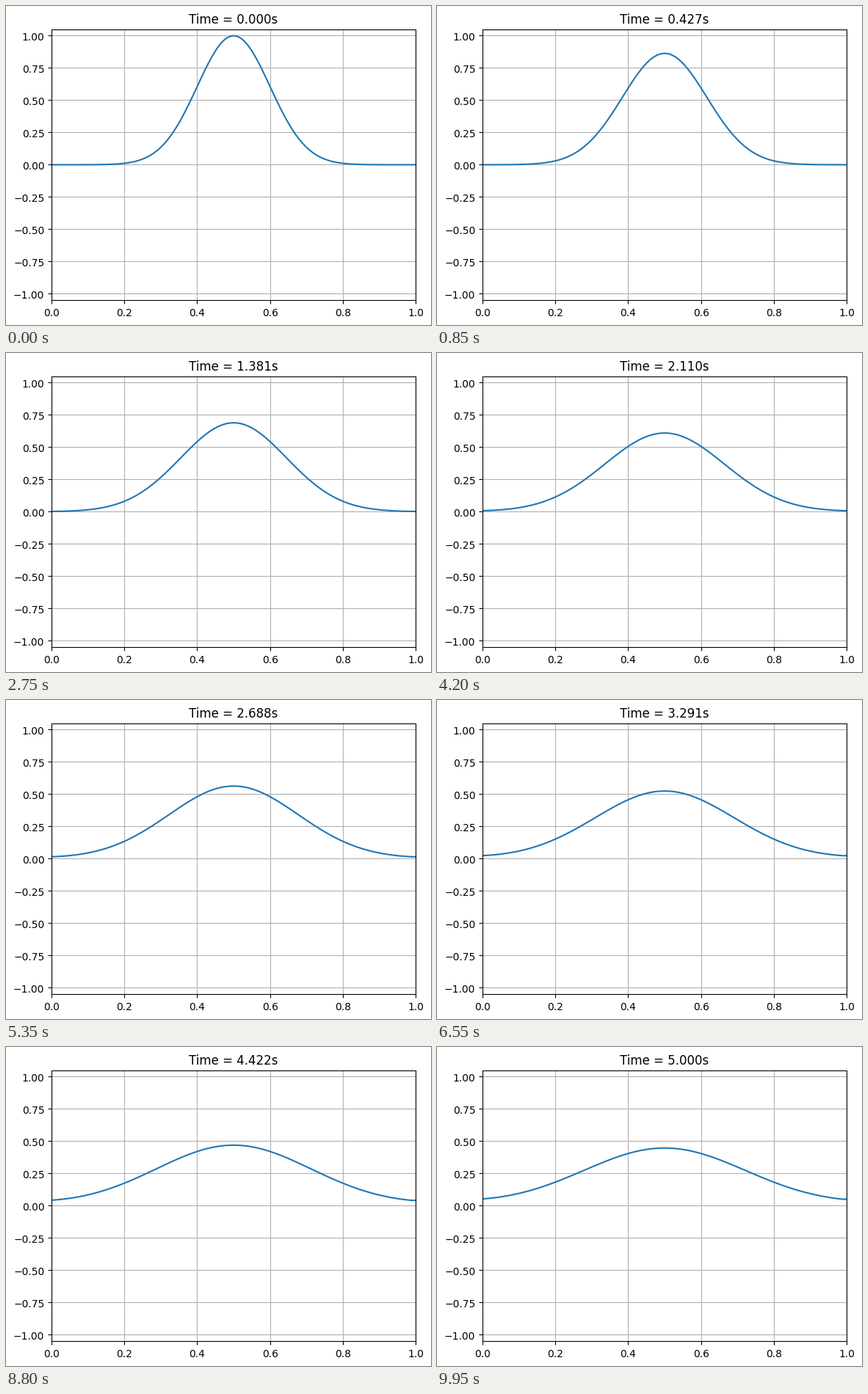
Recreate the animation shown at these times as a matplotlib script. Size 579 by 435 pixels, loop 10000 ms.

```python
import numpy as np
import matplotlib.pyplot as plt
from matplotlib.animation import FuncAnimation
from matplotlib.transforms import Affine2D

WIDTH, HEIGHT, DPI = 579, 435, 100
AXES_BOX = (62.0985, 33.7222, 496, 369.6)  # left, bottom, width, height in px
TEXT_DROP = 0.654  # px, text sits slightly below the snapped lines
FRAMES, INTERVAL = 200, 50
END_MS = 5000
DIFFUSIVITY = 0.004
START_VAR = 0.01
LEFT_ECHO, RIGHT_ECHO = 0.45, 0.30

x = np.linspace(0, 1, 101)


def bump(center, t):
    """Gaussian pulse after diffusing for t seconds."""
    var = START_VAR + 2 * DIFFUSIVITY * t
    return np.sqrt(START_VAR / var) * np.exp(-(x - center) ** 2 / (2 * var))


def profile(t):
    # partly reflecting walls, with a small lift at the right end
    u = bump(0.5, t) + LEFT_ECHO * bump(-0.5, t) + RIGHT_ECHO * bump(1.5, t)
    u[-1] = 1.02 * u[-2]
    return u


def time_at(frame):
    return (END_MS * frame // (FRAMES - 1)) / 1000


# the tiny margin keeps the pixel size from rounding down
fig = plt.figure(figsize=((WIDTH + 0.001) / DPI, (HEIGHT + 0.001) / DPI), dpi=DPI)
left, bottom, width, height = AXES_BOX
ax = fig.add_axes([left / WIDTH, bottom / HEIGHT, width / WIDTH, height / HEIGHT])
ax.set_xlim(0, 1)
ax.set_ylim(-1.05, 1.05)
ax.grid(True)
line, = ax.plot(x, profile(0))
title = ax.set_title("Time = 0.000s")

drop = Affine2D().translate(0, -TEXT_DROP)
for text in [title, *ax.get_xticklabels(), *ax.get_yticklabels()]:
    text.set_transform(text.get_transform() + drop)


def update(frame):
    t = time_at(frame)
    line.set_ydata(profile(t))
    title.set_text(f"Time = {t:.3f}s")
    return line, title


anim = FuncAnimation(fig, update, frames=FRAMES, interval=INTERVAL,
                     repeat=True, repeat_delay=0)
plt.show()
```
